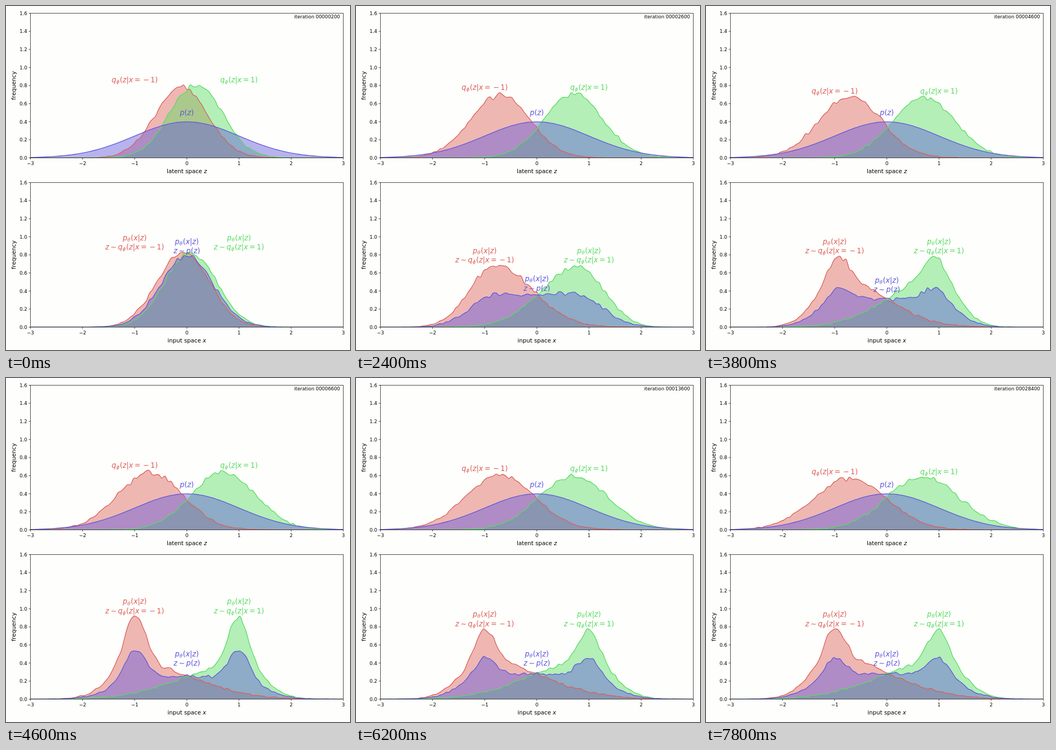
Write an HTML page with a canvas that moves like this. It is 640 px wide and 640 px high and loops after 8 s.

```html
<!DOCTYPE html>
<html lang="en">
<head>
<meta charset="utf-8">
<title>Latent and input densities</title>
<style>
html, body { margin: 0; width: 100%; height: 100%; overflow: hidden; background: #fefefd; }
canvas { display: block; width: 640px; height: 640px; }
</style>
</head>
<body>
<canvas id="stage" width="640" height="640"></canvas>
<script>
const ctx = document.getElementById('stage').getContext('2d');
const FONT = '"DejaVu Sans", sans-serif';
const PT = 64 / 72;
const SMALL = 10 * PT, MEDIUM = 12 * PT, LARGE = 15 * PT;
const STEP = 200, COUNT = 40, BINS = 101;
const LEFT = 45.5, RIGHT = 627.5, UNIT_X = (RIGHT - LEFT) / 6;
const TOP = { y0: 282.5, y1: 13.5 }, BOTTOM = { y0: 597.5, y1: 328.5 };
const UNIT_Y = (TOP.y0 - TOP.y1) / 1.6;

const color = rgb => ({ line: `rgb(${rgb})`, fill: `rgba(${rgb},.45)` });
const RED = color('219,95,87'), GREEN = color('87,219,95'), BLUE = color('95,87,219');

const iterations = [200];
while (iterations.length < COUNT) {
  const n = iterations[iterations.length - 1];
  iterations.push(n + Math.max(200, 100 * Math.floor(n / 1000)));
}

const mix = (a, b, t) => a + (b - a) * t;
const ramp = (f, from, to) => Math.min(1, Math.max(0, (f - from) / (to - from)));
const bell = (x, s) => Math.exp(-x * x / (2 * s * s));
const px = x => LEFT + (x + 3) * UNIT_X;
const binX = i => -3 + 6 * i / (BINS - 1);

// Training: the classes split, the decoder narrows them, a spike grows and then relaxes
function model(frame) {
  const split = Math.sin(ramp(frame, 0, 6) * Math.PI / 2);
  const narrow = ramp(frame, 6, 16), sharpen = ramp(frame, 16, 23), relax = ramp(frame, 23, 31);
  const m = {
    mean: mix(.14, .7, split),
    drift: mix(.04, 0, split),
    sigma: .51 + .005 * frame,
    center: .07 + .63 * split + .29 * ramp(frame, 6, 23),
    outer: .5 + .12 * split - .22 * narrow + .07 * sharpen,
    inner: .5 + .22 * split + .38 * sharpen,
    spike: .53 * sharpen - .19 * relax,
    priorLabel: mix(.785, .372, split) - .035 * sharpen
  };
  m.body = (1 - .5 * m.spike) / (Math.sqrt(Math.PI / 2) * (m.outer + m.inner));
  m.latentPeak = .411 / m.sigma;
  m.inputPeak = 1.035 * m.body + m.spike;
  return m;
}

function random(seed) {
  let a = seed * 7919 + 12345;
  return () => {
    a = (a + 0x6D2B79F5) | 0;
    let t = Math.imul(a ^ (a >>> 15), 1 | a);
    t = (t + Math.imul(t ^ (t >>> 7), 61 | t)) ^ t;
    return ((t ^ (t >>> 14)) >>> 0) / 4294967296;
  };
}

// Noisy histogram of a density, scaled to a given peak if there is one
function sample(density, seed, peak) {
  const rnd = random(seed);
  const ys = Array.from({ length: BINS }, (_, i) => {
    const p = density(binX(i));
    const noise = rnd() + rnd() + rnd() - 1.5;
    return Math.max(0, p + noise * .036 * Math.sqrt(p));
  });
  const k = peak ? peak / Math.max(...ys) : 1;
  return ys.map(y => y * k);
}

function trace(ys, y0) {
  const x = i => px(binX(i)), y = i => y0 - ys[i] * UNIT_Y;
  const path = new Path2D();
  path.moveTo(x(0), y(0));
  for (let i = 0; i < BINS - 1; i++) {
    const a = Math.max(0, i - 1), b = Math.min(BINS - 1, i + 2);
    path.bezierCurveTo(
      x(i) + UNIT_X * .02, y(i) + (y(i + 1) - y(a)) / 6,
      x(i + 1) - UNIT_X * .02, y(i + 1) - (y(b) - y(i)) / 6,
      x(i + 1), y(i + 1));
  }
  return path;
}

function plot(panel, red, green, blue) {
  const curves = [[RED, red], [GREEN, green], [BLUE, blue]]
    .map(([tone, ys]) => ({ tone, path: trace(ys, panel.y0) }));
  ctx.save();
  ctx.beginPath();
  ctx.rect(LEFT, panel.y1, RIGHT - LEFT, panel.y0 - panel.y1);
  ctx.clip();
  for (const { tone, path } of curves) {
    const area = new Path2D(path);
    area.lineTo(RIGHT, panel.y0);
    area.lineTo(LEFT, panel.y0);
    ctx.fillStyle = tone.fill;
    ctx.fill(area);
  }
  ctx.lineWidth = 1.5 * PT;
  ctx.lineJoin = 'round';
  for (const { tone, path } of curves) {
    ctx.strokeStyle = tone.line;
    ctx.stroke(path);
  }
  ctx.restore();
}

function text(str, x, y, size, align = 'center', style = '') {
  ctx.font = `${style} ${size}px ${FONT}`;
  ctx.textAlign = align;
  ctx.fillText(str, x, y);
}

// Sets a formula: variables slanted, Greek letters as subscripts, gaps around relations
function formula(str, cx, y, tone) {
  let x = 0;
  const runs = [...str].map(ch => {
    const sub = 'ϕθ'.includes(ch), slant = sub || 'pqxz'.includes(ch);
    const font = `${slant ? 'italic' : ''} ${sub ? LARGE * .7 : LARGE}px ${FONT}`;
    const before = '=∼'.includes(ch) ? .2 : ch === '−' ? .15 : 0;
    const after = '=∼−'.includes(ch) ? .2 : sub ? .05 : 0;
    ctx.font = font;
    const run = { ch, font, x: x + before * LARGE, dy: sub ? 2.2 : 0 };
    x = run.x + ctx.measureText(ch).width + after * LARGE;
    return run;
  });
  ctx.fillStyle = tone.line;
  ctx.textAlign = 'left';
  for (const r of runs) {
    ctx.font = r.font;
    ctx.fillText(r.ch, cx - x / 2 + r.x, y + r.dy);
  }
}

function axes({ y0, y1 }, name, variable) {
  ctx.strokeStyle = ctx.fillStyle = '#000';
  ctx.lineWidth = .8 * PT;
  ctx.strokeRect(LEFT, y1, RIGHT - LEFT, y0 - y1);
  ctx.beginPath();
  for (let v = -3; v <= 3; v++) {
    ctx.moveTo(px(v), y0);
    ctx.lineTo(px(v), y0 + 3.5 * PT);
    text(String(v).replace('-', '−'), px(v), y0 + 13.8, SMALL);
  }
  for (let i = 0; i <= 8; i++) {
    const y = mix(y0, y1, i / 8);
    ctx.moveTo(LEFT, y);
    ctx.lineTo(LEFT - 3.5 * PT, y);
    text((i / 5).toFixed(1), LEFT - 7 * PT, y + 3.3, SMALL, 'right');
  }
  ctx.stroke();

  ctx.font = `${MEDIUM}px ${FONT}`;
  const w = ctx.measureText(name).width;
  ctx.font = `italic ${MEDIUM}px ${FONT}`;
  const start = (LEFT + RIGHT - w - ctx.measureText(variable).width) / 2;
  text(name, start, y0 + 28.5, MEDIUM, 'left');
  text(variable, start + w, y0 + 28.5, MEDIUM, 'left', 'italic');

  ctx.save();
  ctx.translate(18, (y0 + y1) / 2);
  ctx.rotate(-Math.PI / 2);
  text('frequency', 0, 0, MEDIUM);
  ctx.restore();
}

function draw(frame) {
  const m = model(frame), seed = frame * 5 + 1;
  const normal = (x, mu, s) => bell(x - mu, s) / (s * Math.sqrt(2 * Math.PI));
  const spike = u => m.spike * bell(u, .2);
  const decoded = u => m.body * bell(u, u < 0 ? m.outer : m.inner) + spike(u);
  const red = x => decoded(m.center + x);
  const green = x => decoded(m.center - x);
  const prior = x => (red(x) + green(x)) / 2 + .1 * (spike(m.center + x) + spike(m.center - x));

  ctx.fillStyle = '#fefefd';
  ctx.fillRect(0, 0, 640, 640);

  plot(TOP,
    sample(x => normal(x, m.drift - m.mean, m.sigma), seed, m.latentPeak),
    sample(x => normal(x, m.drift + m.mean, m.sigma), seed + 1, m.latentPeak),
    Array.from({ length: BINS }, (_, i) => normal(binX(i), 0, 1)));
  plot(BOTTOM,
    sample(red, seed + 2, m.inputPeak),
    sample(green, seed + 3, m.inputPeak),
    sample(prior, seed + 4));
  axes(TOP, 'latent space ', 'z');
  axes(BOTTOM, 'input space ', 'x');

  const above = (panel, height) => panel.y0 - height * UNIT_Y - 5.4;
  formula('qϕ(z|x=−1)', px(-1), above(TOP, m.latentPeak), RED);
  formula('qϕ(z|x=1)', px(1), above(TOP, m.latentPeak), GREEN);
  formula('p(z)', px(0), 203, BLUE);

  const pair = (second, x, height, tone) => {
    const y = above(BOTTOM, height);
    formula('pθ(x|z)', px(x), y - 17.5, tone);
    formula(second, px(x), y, tone);
  };
  pair('z∼qϕ(z|x=−1)', -1, m.inputPeak, RED);
  pair('z∼qϕ(z|x=1)', 1, m.inputPeak, GREEN);
  pair('z∼p(z)', 0, m.priorLabel, BLUE);

  ctx.fillStyle = '#000';
  text('iteration ' + String(iterations[frame]).padStart(8, '0'), 621.5, 23.3, SMALL, 'right');
}

const begin = performance.now();
let shown = -1;
function tick() {
  const frame = Math.floor((performance.now() - begin) / STEP) % COUNT;
  if (frame !== shown) draw(shown = frame);
  requestAnimationFrame(tick);
}
tick();
</script>
</body>
</html>
```
